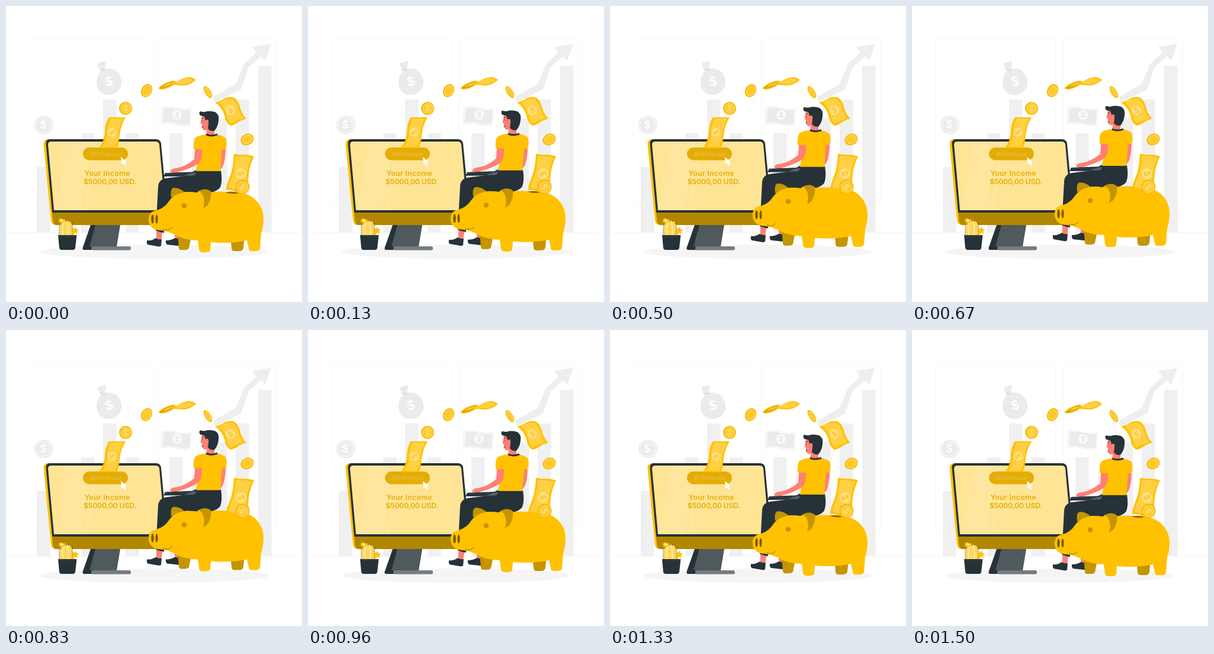
Animation of 500 by 500 pixels, one loop 1540 ms. Source, as an HTML page:

```html
<!DOCTYPE html>
<html lang="en">
<head>
<meta charset="utf-8">
<title>Income withdrawal</title>
<style>
  html, body { margin: 0; width: 100%; height: 100%; overflow: hidden; background: #fff; }
  svg { display: block; width: 100vw; height: 100vh; }
  text { font-family: Inter, "Open Sans", sans-serif; font-weight: 600; }
  .y { fill: #ffc100; }
  .gold { fill: #c49500; }
  .note { fill: #ffd043; }
  .lite { fill: #ffd65c; }
  .dark { fill: #263238; }
  .skin { fill: #ff7f73; }
</style>
</head>
<body>
<svg viewBox="0 0 500 500">
  <!-- backdrop -->
  <g fill="none" stroke="#f8f8f8">
    <rect x="39.5" y="55.5" width="203" height="282" rx="2"/>
    <rect x="255.5" y="55.5" width="202" height="282" rx="2"/>
    <path d="M0 382.5H500" stroke="#f5f5f5"/>
  </g>
  <g id="bars" fill="#f0f0f0"></g>
  <path fill="#eee" d="M350 153L388 132 402 98 423 79 416 69 448 64 438 92 431 85 410 103 397 141 352 163Z"/>

  <g fill="#ebebeb">
    <path d="M155 101Q154 95 159 96Q165 92 169 94L167 106Q185 103 192 117Q199 131 190 143Q181 152 168 150Q154 146 153 130Q153 116 162 108Z"/>
    <path d="M157 104Q161 108 167 105L168 109Q162 111 158 107Z" fill="#dfdfdf"/>
    <path d="M262 171Q275 167 288 171Q302 176 314 171L312 202Q301 205 288 201Q274 197 261 201Z" fill="#f6f6f6"/>
    <path d="M267 173Q278 170 288 174Q301 178 312 175L310 198Q300 201 288 198Q276 194 265 197Z"/>
    <circle cx="289" cy="184" r="8" fill="#fafafa"/>
    <circle cx="65" cy="201" r="16" fill="#f5f5f5"/>
    <circle cx="63" cy="201" r="15.5" fill="#f0f0f0"/>
    <circle cx="63" cy="201" r="12" stroke="#f8f8f8"/>
  </g>
  <g id="pale"></g>
  <ellipse cx="250" cy="415" rx="193" ry="12" fill="#f5f5f5"/>

  <!-- monitor -->
  <path class="dark" d="M143 370H165L146 412H132Q128 411 130 407Z"/>
  <path fill="#50595d" d="M151 370H193L187 406H141Z"/>
  <path class="dark" d="M131 406H160V412H132Q128 411 131 406Z"/>
  <rect x="144" y="406" width="67" height="6.5" rx="3" fill="#757b7e"/>
  <path class="y" d="M70 225H240V370H84Q77 370 76 362L63.500 234Q63 226 70 225Z"/>
  <path fill="#b28700" d="M78 347H271L273 370H86Q80 370 79 362Z"/>
  <path class="dark" d="M73 225H253Q261 225 262 233L273 349H78L67.500 233Q67 226 73 225Z"/>
  <path fill="#ffe495" d="M75 229H253Q258 229 259 234L269 345H81L71 234Q71 230 75 229Z"/>
  <path fill="#ffe8a6" opacity=".6" d="M103 229H144L126 345H84ZM149 229H155L138 345H132Z"/>

  <rect x="130" y="239" width="76" height="21.5" rx="10.7" fill="#e3ad05"/>
  <g fill="#e5b004">
    <text x="141.5" y="254" font-size="11" letter-spacing=".3" fill="#ebbb33">Withdraw</text>
    <text x="132.5" y="287" font-size="12.3" letter-spacing=".25">Your Income</text>
    <text x="131" y="300.5" font-size="12.3" letter-spacing="-.2">$5000,00 USD.</text>
  </g>
  <path fill="#fff" d="M194 255L204.500 263.500 200.500 264.500 203 269 200.500 270 198.500 265.500 195.500 268Z"/>

  <!-- flying money -->
  <path class="y" d="M174 188H202Q194 201 192 217Q191 232 187 240H157Q167 227 167 211Q168 195 174 188Z"/>
  <path class="note" d="M177 190H198Q191 202 190 216Q188 231 184 238H163Q171 226 171 211Q172 198 177 190Z"/>
  <path class="y" d="M257 139Q266 129 283 126L289 128Q297 121 310 120Q317 121 321 125Q308 136 295 134L284 133Q274 140 262 141Z"/>
  <path class="note" d="M288 129Q298 122 309 122L317 125Q306 133 296 132L282 130Z"/>
  <path fill="#dba600" d="M259 138Q270 130 284 127L279 134Q270 139 262 140Z"/>
  <path class="note" d="M264 137Q273 130 283 129L278 133Z"/>
  <path class="y" d="M353 163Q362 161 369 156Q377 152 386 155Q394 162 396 174Q400 185 406 190.500Q398 192 391 197Q385 202 378 202Q370 195 369 184Q364 170 353 163Z"/>
  <path class="note" d="M360 163Q372 155 383 157Q391 164 393 175Q396 185 401 190Q388 193 379 199Q373 191 372 182Q368 170 360 163Z"/>
  <g id="coins"></g>

  <!-- rider and pig -->
  <g id="ride">
    <path class="skin" d="M254 378H265L262 396H254ZM284 380H297V396H286Z"/>
    <path class="dark" d="M238 396Q246 397 253 392Q257 395 263 394L262 405Q260 407 256 406L239 403Q237 400 238 396ZM270 396Q279 396 285 392L297 394V405H290L272 403Q269 400 270 396Z"/>
    <path class="dark" d="M321 277L363 278Q366 295 362 306Q355 316 334 316L304 314Q289 317 286 326L294 384H281L270 335 267 383Q259 382 253 379L257 305Q258 293 270 291L303 287Z"/>
    <path class="skin" d="M364 240L371 239Q371 257 367 269Q364 276 359 277L363 260Z"/>
    <path class="skin" d="M341 202L352 208V219Q344 222 338 217Z"/>
    <path class="skin" d="M331 184Q330 192 328.500 198L331 200Q330 208 335 210Q340 211 343 208L347 195 342 183Z"/>
    <path class="dark" d="M328 185Q325 180 328 178Q332 179 335 179Q343 176 353 179Q361 183 359 194Q358 204 352 211Q345 212 341 207L342 199Q338 198 338 194L336 191Q338 186 328 185Z"/>
    <ellipse class="skin" cx="339.500" cy="196" rx="2.800" ry="4"/>
    <path d="M331 190L334 189M332 193V194.500M330.500 205L333 204.500" stroke="#263238" fill="none"/>
    <path class="y" d="M337 217Q346 222 357 217Q366 219 371 223Q374 232 371 242H365L362 279H321Q325 260 325 243L317 242Q316 231 319 223Q326 218 337 217Z"/>
    <path d="M338 217Q346 221 357 217" fill="none" stroke="#263238" stroke-width="3"/>
    <path class="skin" d="M319 242H331Q332 259 325 266Q312 275 292 280L286 283 277 280Q279 274 287 274Q302 272 318 259Z"/>
    <path class="dark" d="M269 282L323 280 318 287.500 266 288Z"/>
    <path fill="#566267" d="M313 282L322 281 318 286.500 300 287Z"/>
    <path d="M271 283.500H312" stroke="#4d5a60" stroke-width="1" stroke-dasharray="2 2"/>

    <path class="gold" d="M290 385H314L309 409Q308 412 302 412H296Q292 412 292 408ZM379 388H403L401 409Q400 414 394 414H386Q381 414 381 409Z"/>
    <path class="gold" d="M279 323Q277 309 283 307Q294 307 302 315L292 326Z"/>
    <path class="y" d="M241 358Q242 347 255 345Q268 341 275 330Q283 318 299 315Q315 312 331 318Q348 312 374 314Q407 313 422 328Q435 341 435 360Q435 373 431 384L429 410Q428 414 421 414H415Q410 414 410 409L407 396Q378 402 346 399L345 412Q344 416 338 416H332Q327 416 326 411L324 396Q301 395 288 388Q277 381 262 379Q249 379 244 371Q240 365 241 358Z"/>
    <path class="gold" d="M324 313Q337 306 346 313Q348 325 340 337L333 342Q336 326 324 313Z"/>
    <path class="y" d="M322 315Q328 311 332 319Q337 329 333 341Q323 330 322 315Z"/>
    <circle class="gold" cx="301" cy="337.500" r="4.200"/>
    <g fill="#765900">
      <ellipse cx="247.500" cy="360" rx="2.200" ry="7.500"/>
      <ellipse cx="254.500" cy="360" rx="2" ry="7.500"/>
    </g>
    <path d="M265 377Q274 381 281 374" fill="none" stroke="#9a7500"/>
    <path fill="#8b6900" d="M371 315Q382 312 393 316Q383 319 371 315Z"/>
  </g>

  <!-- money entering the slot -->
  <path class="y" d="M385 249.500Q394 252 402 251Q411 251 419 254Q412 268 410 283Q409 299 405 314Q397 316 388 314Q381 310 372 311Q372 302 377 291Q384 276 385 249.500Z"/>
  <path class="note" d="M388 253Q402 253 415 256Q408 270 407 283Q406 299 402 311Q390 310 376 307Q376 301 381 291Q387 276 388 253Z"/>
  <g id="front"></g>

  <!-- cactus -->
  <path class="lite" d="M91 388Q88 376 93 368Q99 359 108 364Q113 369 111 376L115 377Q119 383 114 388Z"/>
  <path d="M97 387Q93 376 98 366M105 387Q107 375 103 365" fill="none" stroke="#ffe9a8" stroke-width="2"/>
  <path d="M90 371V386M112 367V386" fill="none" stroke="#263238" stroke-width="1.500" stroke-dasharray="1 2.500"/>
  <path d="M97 363H109" stroke="#263238" stroke-width="1.500" stroke-dasharray="1 3"/>
  <path class="y" d="M89 361L93 358 96 361 101 360 98 365 94 367 90 366ZM111 375L115 376 118 373 119 377 123 378 120 381 121 385 117 383 113 385 114 381Z"/>
  <path fill="#ffe7a0" d="M91 362L94 360 98 361 95 365Z"/>
  <path class="dark" d="M88 387H119.500L117 409Q116 412 113 412H94Q91 412 90 409Z"/>
  <path d="M88 389H119" stroke="#3a474d"/>
</svg>
<script>
const get = id => document.getElementById(id);
const LOOP = 1540, RISE = 9, LEAD = 50;

const dollar = (x, y, size, turn, fill) =>
  `<text x="${x}" y="${y}" dy=".36em" font-size="${size}" text-anchor="middle" fill="${fill}" transform="rotate(${turn} ${x} ${y})">$</text>`;

function coin(x, y, rx, ry, turn, size) {
  const face = `<g transform="translate(${x} ${y}) rotate(${turn})">
    <ellipse rx="${rx}" ry="${ry}" fill="#f5b800"/>
    <ellipse cx=".5" rx="${rx - 1.5}" ry="${ry - 1.5}" fill="#ffcd40"/>
    <ellipse rx="${rx * .68}" ry="${ry * .7}" fill="#ffc928" stroke="#ffd766" stroke-width=".8"/></g>`;
  return face + (size ? dollar(x, y, size, turn, '#ffe08a') : '');
}

const seal = (x, y, r, turn) =>
  `<circle cx="${x}" cy="${y}" r="${r}" fill="#ffe083"/>` + dollar(x, y, r * 1.6, turn, '#fcc521');

// left edge and top of each chart column
get('bars').innerHTML = [[52, 272], [90, 245], [127, 215], [164, 158], [202, 215],
  [276, 215], [314, 245], [351, 190], [388, 158], [426, 101]]
  .map(([x, y]) => `<rect x="${x}" y="${y}" width="22.5" height="${382 - y}"/>`).join('');

get('pale').innerHTML = dollar(174, 127, 21, -15, '#fff') + dollar(63, 201, 18, 0, '#fff') +
  dollar(289, 184, 12, 10, '#e6e6e6');

get('coins').innerHTML = seal(179, 213.500, 7.500, 65) + seal(379, 176, 8, -25) +
  coin(202, 173, 11, 11, 10, 13) + coin(237.500, 143, 9, 11.500, 30, 0) +
  coin(341, 145.500, 5, 11.500, -32, 0) + coin(407.500, 225.500, 11.500, 9.500, -25, 0);

get('front').innerHTML = seal(397, 283, 9, 75) + coin(399.500, 305.500, 12, 12, 55, 14);

function draw(t) {
  const turn = (t % LOOP + LEAD) / LOOP * 2 * Math.PI;
  const lift = RISE * (1 - Math.cos(turn)) / 2;
  get('ride').setAttribute('transform', `translate(0 ${-lift.toFixed(2)})`);
}

const start = performance.now();
function tick() {
  draw(performance.now() - start);
  requestAnimationFrame(tick);
}
tick();
</script>
</body>
</html>
```
